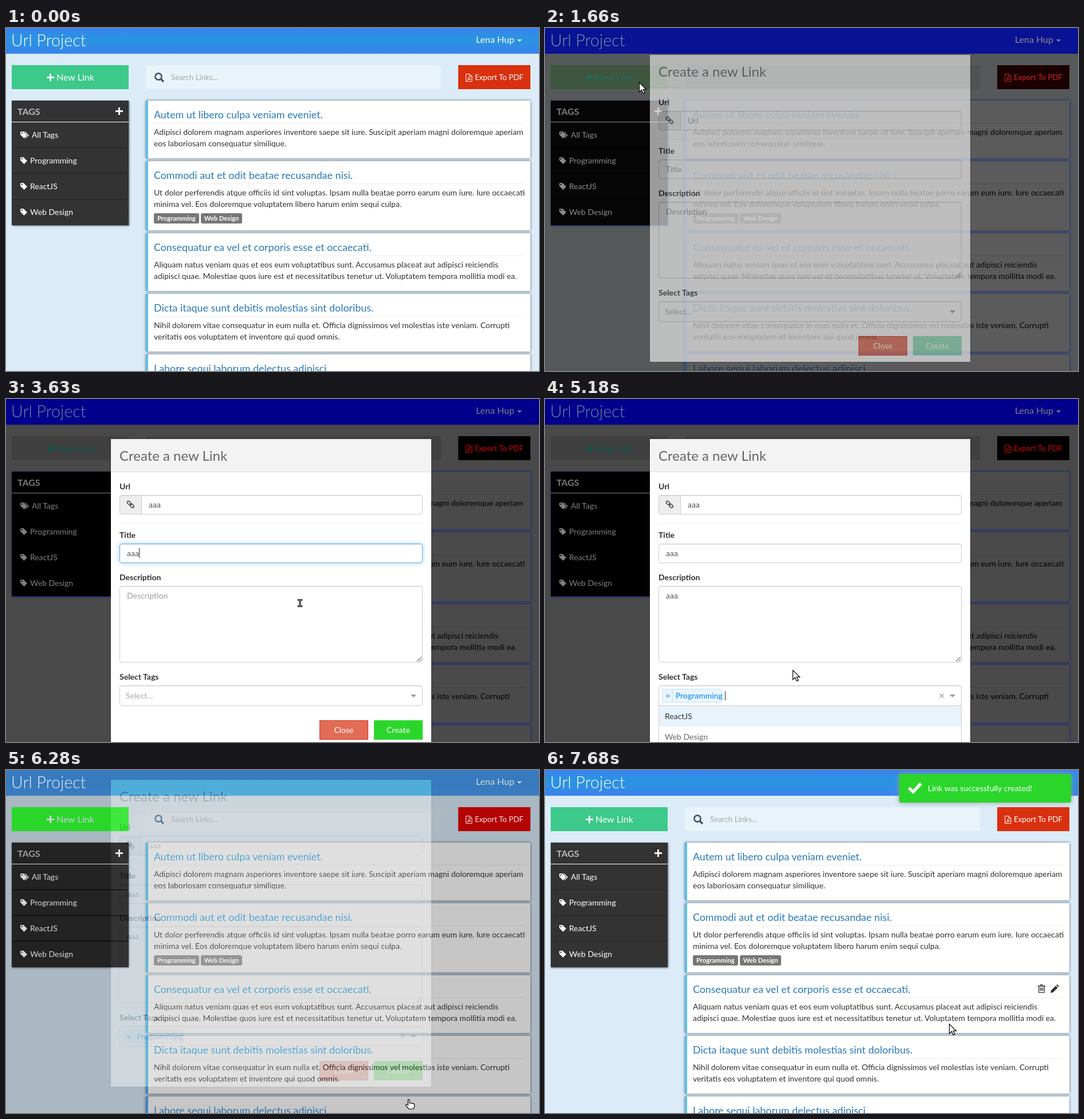
Animation, 930 px wide and 600 px high, one loop 9450 ms. Source, as an HTML page:

```html
<!DOCTYPE html>
<html lang="en">
<head>
<meta charset="utf-8">
<title>Url Project</title>
<style>
html, body { margin: 0; width: 100%; height: 100%; overflow: hidden; }
#stage { position: relative; width: 930px; height: 600px; overflow: hidden; background: var(--page);
  font: 14px/20px Lato, sans-serif; color: var(--text); }
#stage * { box-sizing: border-box; }
.abs, svg { position: absolute; white-space: nowrap; }
svg { overflow: visible; fill: currentColor; }
svg.line { fill: none; stroke: currentColor; }
b { font-weight: 700; }
.head { background: linear-gradient(var(--head), var(--head2) 35%, var(--head2) 55%, var(--head)); }
.brand { font-size: 28.6px; font-weight: 300; color: var(--brand); }
.user { font-size: 16px; color: var(--white); }
.new { background: var(--new); color: var(--newText); font-size: 16px; }
.search { background: var(--search); border-radius: 5px; }
.export { background: var(--export); color: var(--exportText); }
.small { font-size: 13.33px; }
.panel { background: var(--panel); box-shadow: 1px 1px 3px var(--edge); color: var(--white); }
.card { background: var(--card); border-left: 4px solid var(--bar); box-shadow: 0 0 4px var(--edge);
  font-size: 13.93px; }
.card .title { font-size: 17.85px; color: var(--link); }
.label { display: inline-block; height: 18px; padding: 0 6px; margin-right: 3px; border-radius: 3px;
  background: var(--label); color: var(--white); font: 700 11.2px/18px Lato, sans-serif; }
.modal { background: #fff; box-shadow: 0 0 0 1px rgba(0,0,0,.2); color: #333; }
.field { background: #fff; border: 1px solid #ccc; border-radius: 4px; padding: 6px 12px; color: #555;
  box-shadow: inset 0 1px 1px rgba(0,0,0,.075); }
.field.focus { border-color: #66afe9; box-shadow: inset 0 1px 1px rgba(0,0,0,.075), 0 0 8px rgba(102,175,233,.6); }
.field.empty { color: #999; }
.field span { display: inline-block; height: 17px; line-height: 18px; vertical-align: top; margin-top: 1px;
  border-right: 1px solid transparent; }
.field.focus:not(.empty) span { border-color: #222; }
.button { width: 85px; height: 34px; line-height: 34px; text-align: center; color: #fff; }
.option { left: 0; width: 527px; height: 36px; line-height: 36px; padding-left: 10px; color: #666; }
.option.on { background: #e8f3fc; color: #333; }
.toast { background: #2bd62b; color: #fff; border-radius: 3px; box-shadow: 0 0 10px #999; }
</style>
</head>
<body>
<div id="stage"></div>
<script>
const LOOP = 9450;
const stage = document.getElementById('stage');
const $ = id => document.getElementById(id);

// Each colour at three depths of the backdrop: none, part way, full.
const COLORS = {
  page: ['#dbecf8', '#a5b4bd', '#494949'],
  head: ['#3b82ee', '#3b7bbd', '#00008c'],
  head2: ['#2b92e2', '#3878bb', '#00008c'],
  brand: ['#ffffff', '#dfe8f0', '#5f8c94'],
  white: ['#ffffff', '#d4d4d4', '#7f7f7f'],
  new: ['#3cc98a', '#2bd62b', '#404040'],
  newText: ['#ffffff', '#c4ccd8', '#0b5a50'],
  search: ['#e8f3fa', '#a9b5bc', '#404040'],
  hint: ['#a5a8aa', '#70777c', '#404040'],
  export: ['#d9300f', '#b00000', '#000000'],
  exportText: ['#ffffff', '#e6e0e0', '#d00000'],
  panel: ['#333333', '#222222', '#000000'],
  rule: ['#222222', '#000000', '#000000'],
  tags: ['#b8b8b8', '#999999', '#777777'],
  card: ['#ffffff', '#c1c1c1', '#4a4a4a'],
  hr: ['#eeeeee', '#b0b0b0', '#424242'],
  bar: ['#5bc0ea', '#3a80c0', '#3a5060'],
  edge: ['#555c62', '#394450', '#001a90'],
  link: ['#2a78b8', '#2b6fae', '#10304c'],
  label: ['#777777', '#666666', '#303030'],
  text: ['#333333', '#2b2b2b', '#000000'],
};

const ICONS = {
  plus: '<path d="M5 0h3v5h5v3H8v5H5V8H0V5h5z"/>',
  search: '<g fill="none" stroke="currentColor"><circle cx="7" cy="7" r="5.6" stroke-width="2.6"/><path d="M11 11l5 5" stroke-width="3.2"/></g>',
  tag: '<path fill-rule="evenodd" d="M0 1l1-1h4.5L12 6.5 6.5 12 0 5.5zM1.5 2.8a1.2 1.2 0 1 0 2.4 0a1.2 1.2 0 1 0-2.4 0"/>',
  more: '<path d="M7 0h1.6L15 6.5 9.4 12l-.8-.8L13 6.5z"/>',
  pdf: '<path d="M.6.6h6.6l3.8 3.8v9H.6zM7 .8v3.8h4M2.6 11.4C5 10 6 7 5.4 5.2 5.6 8 7 9.3 9.2 9.4 7 9.2 4.6 10 2.6 11.4"/>',
  link: '<g transform="rotate(45 6.5 6.5)" stroke-width="1.7"><rect x="-1" y="4.2" width="7.4" height="4.6" rx="2.2"/><rect x="6.2" y="4.2" width="7.4" height="4.6" rx="2.2"/><path d="M4.5 6.5h4"/></g>',
  trash: '<path stroke-width="1.3" d="M0 3h13M4 3l.8-2.3h3.4L9 3M1.6 3v10.2q0 1.2 1.2 1.2h7.4q1.2 0 1.2-1.2V3M4.3 5.5v6M6.5 5.5v6M8.7 5.5v6"/>',
  pencil: '<path d="M0 15l1-4.5 8-8L12.5 6l-8 8zM10 1.5L11.5 0 15 3.5 13.5 5z"/>',
  check: '<path d="M0 11l4-3.5 5.5 5L20.5 0 25 3.5 9.5 20z"/>',
  down: '<path d="M0 0h10L5 5z"/>',
  grip: '<path d="M0 8l8-8M4.5 8L8 4.5"/>',
};

const icon = (name, x, y, cls = '', css = '') =>
  `<svg class="${cls}" width="1" height="1" style="left:${x}px;top:${y}px;${css}">${ICONS[name]}</svg>`;
const box = (x, y, w, h, cls, inner = '', id = '', css = '') =>
  `<div class="abs ${cls}" id="${id}" style="left:${x}px;top:${y}px;width:${w}px;height:${h}px;${css}">${inner}</div>`;
// Text whose line is centred on height y.
const text = (x, y, s, cls = '', css = '', id = '') =>
  `<div class="abs ${cls}" id="${id}" style="left:${x}px;top:${y - 10}px;${css}">${s}</div>`;
const rule = (x, y, w, color) => box(x, y, w, 1, '', '', '', `background:${color}`);

const CARDS = [
  [127, 'Autem ut libero culpa veniam eveniet.',
    'Adipisci dolorem magnam asperiores inventore saepe sit iure. Suscipit aperiam magni doloremque aperiam<br>eos laboriosam consequatur similique.'],
  [233, 'Commodi aut et odit beatae recusandae nisi.',
    'Ut dolor perferendis atque officiis id sint voluptas. Ipsam nulla beatae porro earum eum iure. Iure occaecati<br>minima vel. Eos doloremque voluptatem libero harum enim sequi culpa.',
    ['Programming', 'Web Design']],
  [359, 'Consequatur ea vel et corporis esse et occaecati.',
    'Aliquam natus veniam quas et eos eum voluptatibus sunt. Accusamus placeat aut adipisci reiciendis<br>adipisci quae. Molestiae quos iure est et necessitatibus tenetur ut. Voluptatem tempora mollitia modi ea.'],
  [465, 'Dicta itaque sunt debitis molestias sint doloribus.',
    'Nihil dolorem vitae consequatur in eum nulla et. Officia dignissimos vel molestias iste veniam. Corrupti<br>veritatis eos voluptatem et inventore qui quod omnis.'],
  [571, 'Labore sequi laborum delectus adipisci.', ''],
];
const cardHeight = c => c[3] ? 121 : 101;

const card = c => box(244, c[0], 671, cardHeight(c), 'card',
  text(10, 24, c[1], 'title') + rule(10, 39, 647, 'var(--hr)') + text(10, 55, c[2]) +
  (c[3] ? box(10, 91, 200, 18, '', c[3].map(s => `<span class="label">${s}</span>`).join(''), '', 'font-size:0') : ''));

const tagRow = (s, i) => {
  const y = 38 + 45 * i;
  return icon('tag', 15, y + 16) + (i ? '' : icon('more', 15, y + 16)) +
    text(i ? 32 : 35, y + 22, s) + (i < 3 ? rule(0, y + 44, 204, 'var(--rule)') : '');
};

const page =
  box(0, 0, 930, 45, 'head') + text(9, 21, 'Url Project', 'brand') +
  text(0, 20, 'Lena Hup', 'user', 'left:auto;right:43px') +
  icon('down', 892, 20, '', 'color:var(--white);transform:scale(.8);transform-origin:0 0') +
  box(10, 65, 204, 42, 'new', icon('plus', 60.5, 14.5) + text(78, 21, 'New Link')) +
  box(244, 65, 515, 42, 'search', icon('search', 15, 13, '', 'color:#44566c') +
    text(44, 21, 'Search Links...', 'small', 'color:var(--hint)')) +
  box(789, 65, 126, 42, 'export', icon('pdf', 13, 15, 'line') + text(29, 21, 'Export To PDF', 'small')) +
  box(10, 127, 204, 218, 'panel', text(10, 19, '<b>TAGS</b>', '', 'font-size:16px;color:var(--tags)') +
    icon('plus', 181, 12) + rule(0, 37, 204, 'var(--white)') +
    ['All Tags', 'Programming', 'ReactJS', 'Web Design'].map(tagRow).join('')) +
  CARDS.map(card).join('') +
  `<div class="abs" id="tools" style="left:860px">${icon('trash', 0, 0, 'line')}${icon('pencil', 22, 0)}</div>`;

const name = (y, s) => text(15, y, `<b>${s}</b>`);
const modal = box(183, 70, 559, 537, 'modal',
  box(0, 0, 559, 58, '', text(15, 29, 'Create a new Link', '', 'font-size:24px;color:#666'), '',
    'background:#f3f3f3;border-bottom:1px solid #ddd') +
  name(83, 'Url') + name(168, 'Title') + name(242, 'Description') + name(416, 'Select Tags') +
  box(15, 98, 39, 34, 'field', icon('link', 12, 9, 'line'), '', 'background:#eee;border-radius:4px 0 0 4px') +
  box(53, 98, 491, 34, 'field', '', 'url', 'border-radius:0 4px 4px 0') +
  rule(15, 147, 529, '#eee') +
  box(15, 183, 529, 34, 'field', '', 'title') +
  box(15, 257, 529, 134, 'field', '', 'desc') + icon('grip', 534, 381, 'line') +
  box(15, 431, 529, 36, 'field', '', 'select') +
  text(26, 449, 'Select...', '', 'color:#aaa', 'hint') +
  box(21, 437, 105, 24, '', text(5, 10.5, '×') + text(23, 10.5, 'Programming') +
    box(17, 0, 1, 22, '', '', '', 'background:#c2e0ff'), 'chip',
    'background:#ebf5ff;border:1px solid #c2e0ff;border-radius:2px;color:#0088f0') +
  text(504, 448, '×', '', 'font-size:18px;color:#999', 'clear') +
  box(131, 441, 1, 16, '', '', 'caret', 'background:#222') +
  icon('down', 523, 447, '', 'color:#999') +
  box(364, 492, 85, 34, 'button', 'Close', '', 'background:#e26c56;box-shadow:inset 0 0 0 1px #d2321a') +
  box(459, 492, 85, 34, 'button', 'Create', 'create') +
  box(15, 466, 529, 120, '', '', 'menu', 'background:#fff;border:1px solid #ccc'), 'modal');

const toast = box(618, 7, 300, 50, 'toast', icon('check', 15, 15) + text(50, 25, 'Link was successfully created!'), 'toast');

const pointer = (id, d) =>
  `<svg id="${id}" width="1" height="1"><path fill="#fff" stroke="#000" stroke-width="1.2" d="${d}"/></svg>`;
const pointers =
  pointer('arrow', 'M.5.5v16.5l4-3.7 2.7 6 2.8-1.2-2.7-5.8h5.2z') +
  pointer('beam', 'M-3.5-6.5h2.5l1 .8 1-.8h2.5v2H1v9h2.5v2H1l-1-.8-1 .8h-2.5v-2H-1v-9h-2.5z') +
  pointer('hand', 'M-2.5 1.5q0-1.5 1.3-1.5t1.3 1.5v5l6 .8q2.6.4 2.6 2.4v3l-1.6 4.3H-1.2l-5-6q-1-1.6.4-2.2 1.4-.4 3.3 1.4z');

stage.innerHTML = page + modal + toast + pointers;

// Pointer stops: time, x, y.
const PATH = [
  [980, 335, -4], [1230, 164, 95], [1800, 164, 95], [2250, 389, 250], [2550, 389, 250], [2900, 470, 270],
  [3480, 470, 270], [3600, 513, 357], [4150, 513, 357], [4420, 470, 520], [4500, 470, 520], [4740, 460, 552],
  [5020, 460, 552], [5180, 432, 474], [5330, 432, 474], [5820, 704, 576], [6350, 704, 576], [6900, 703, 498],
  [6990, 703, 498], [7200, 705, 444], [LOOP, 705, 444],
];

const clamp = u => Math.max(0, Math.min(1, u));
const ramp = (t, a, b) => clamp((t - a) / (b - a));
const mix = (a, b, u) => a + (b - a) * u;
const channels = hex => [1, 3, 5].map(i => parseInt(hex.substr(i, 2), 16));
const blend = (a, b, u) => `rgb(${channels(a).map((v, i) => Math.round(mix(v, channels(b)[i], u)))})`;
const show = (id, on) => { $(id).style.display = on ? 'block' : 'none'; };

function pointerAt(t) {
  const i = PATH.findIndex(p => p[0] > t);
  if (i < 1) return [PATH[0][1], PATH[0][2]];
  const [a, b] = [PATH[i - 1], PATH[i]];
  const u = ramp(t, a[0], b[0]), s = u * u * (3 - 2 * u);
  return [mix(a[1], b[1], s), mix(a[2], b[2], s)];
}

function setColors(depth, hover) {
  for (const [key, [a, b, c]] of Object.entries(COLORS)) {
    const base = key === 'new' && hover ? b : a;
    const color = depth < .35 ? blend(base, b, depth / .35) : blend(b, c, (depth - .35) / .65);
    stage.style.setProperty('--' + key, color);
  }
}

function setField(id, t, keys, hint, from, to) {
  const typed = 'a'.repeat(keys.filter(k => t >= k).length);
  const el = $(id);
  el.innerHTML = `<span>${typed || hint}</span>`;
  el.classList.toggle('empty', !typed);
  el.classList.toggle('focus', t >= from && t < to);
}

function setMenu(t, picked) {
  const open = t >= 4460 && t < 5320;
  show('menu', open);
  show('chip', picked);
  show('clear', picked);
  show('hint', !picked && !open);
  show('caret', open);
  $('caret').style.left = picked ? '131px' : '26px';
  const options = ['Programming', 'ReactJS', 'Web Design'].slice(picked ? 1 : 0);
  $('menu').innerHTML = options.map((s, i) =>
    `<div class="abs option ${i ? '' : 'on'}" style="top:${36 * i}px">${s}</div>`).join('');
}

function render(t) {
  const closing = t >= 6220;
  const slide = closing ? 1 - (1 - ramp(t, 6220, 6520)) ** 2 : (1 - ramp(t, 1480, 1780)) ** 2;
  const fade = closing ? 1 - ramp(t, 6220, 6330) : ramp(t, 1480, 1780);
  const depth = closing ? 1 - ramp(t, 6220, 6310) : ramp(t, 1480, 1680);
  const [x, y] = pointerAt(t);

  setColors(depth, t >= 1180 && t < 6320);
  const sheet = $('modal').style;
  sheet.opacity = fade;
  sheet.transform = `translateY(${Math.round(-145 * slide)}px)`;
  // While faint, the sheet brightens the page but leaves its text dark.
  sheet.mixBlendMode = fade < .5 ? 'overlay' : 'normal';

  setField('url', t, [2340, 2460, 2540], 'Url', 1850, 3000);
  setField('title', t, [3170, 3250, 3330], 'Title', 3000, 3760);
  setField('desc', t, [3950, 4030, 4110], 'Description', 3760, 4460);
  $('create').style.background = t >= 3170 ? '#2bd62b' : '#8ee0ba';
  setMenu(t, t >= 5000);

  const hovered = t > 6400 && CARDS.find(c => y >= c[0] && y < c[0] + cardHeight(c));
  show('tools', hovered);
  if (hovered) $('tools').style.top = hovered[0] + 16 + 'px';

  const inField = (t >= 2780 && t < 3480) || (t >= 3540 && t < 4260);
  const kind = inField ? 'beam' : t >= 5860 && t < 6350 ? 'hand' : 'arrow';
  for (const id of ['arrow', 'beam', 'hand']) {
    show(id, t >= 980 && id === kind);
    $(id).style.left = Math.round(x) + 'px';
    $(id).style.top = Math.round(y) + 'px';
  }
  $('toast').style.opacity = ramp(t, 7390, 7680);
}

const start = performance.now();
function tick() {
  render((performance.now() - start) % LOOP);
  requestAnimationFrame(tick);
}
tick();
</script>
</body>
</html>
```
